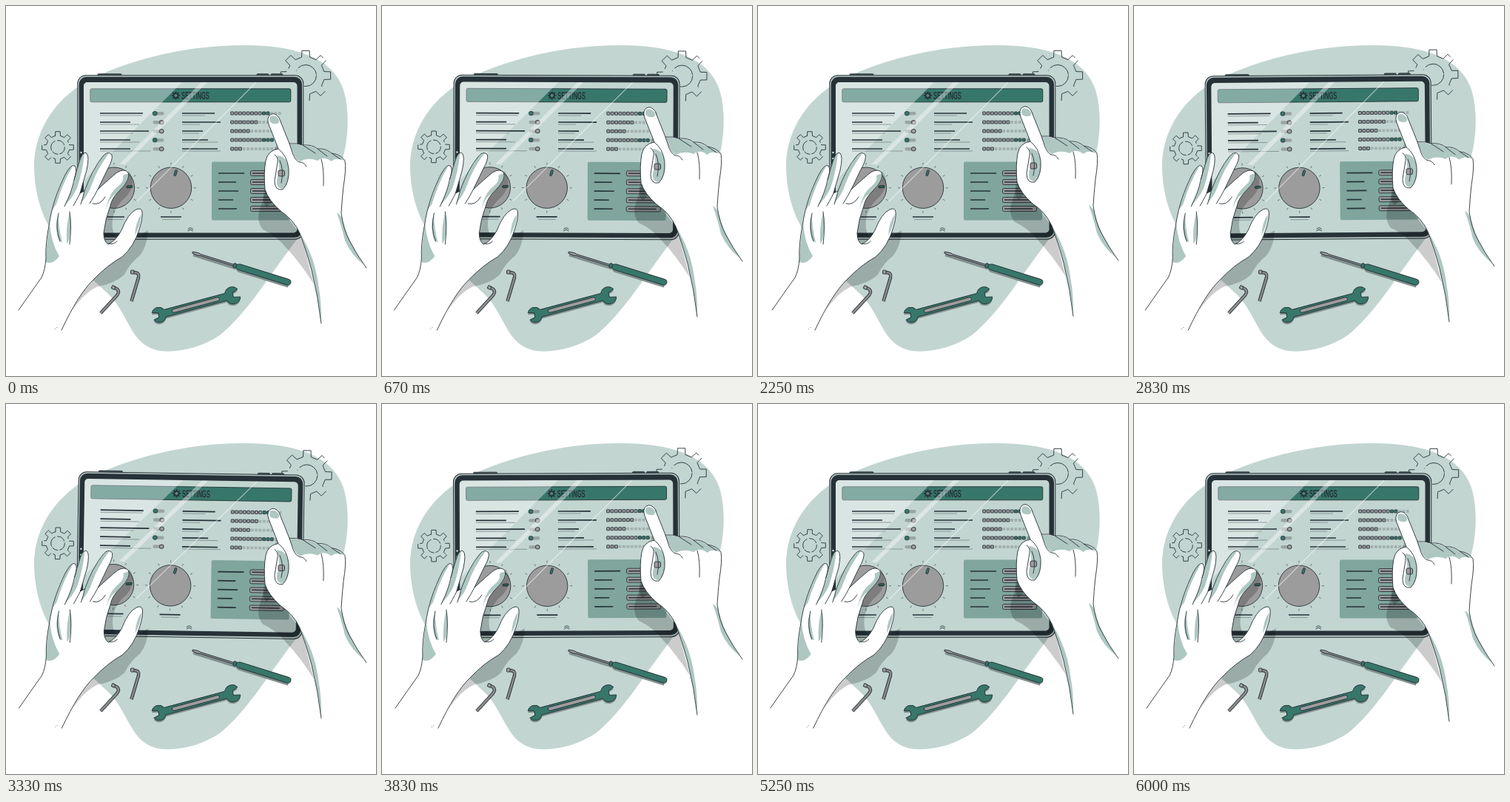
Animation of 500 by 500 pixels, one loop 6.04 s. Source, as an HTML page:

```html
<!DOCTYPE html>
<html lang="en">
<head>
<meta charset="utf-8">
<title>Settings</title>
<style>
  html, body { margin: 0; width: 100%; height: 100%; overflow: hidden; background: #fff; }
  svg { display: block; width: 100%; height: 100%; }
  .line { fill: none; stroke: #263238; stroke-width: .9; stroke-linecap: round; stroke-linejoin: round; }
  .skin { fill: #fff; }
  .shade { fill: #aec7c1; }
  .shadow { fill: #000; opacity: .2; }
  .green { fill: #37776a; stroke: #263238; stroke-width: .9; }
  .gray { fill: #9c9c9c; stroke: #263238; stroke-width: .9; }
  text { font: bold 14px "Liberation Sans", Arial, sans-serif; fill: #263238; }
</style>
</head>
<body>
<svg viewBox="0 0 500 500">
  <defs>
    <clipPath id="screen"><rect x="105" y="103" width="288.500" height="203.500" rx="5"/></clipPath>
    <path id="leftHand" d="M17 411Q33 388 48 367Q53 357 54 341Q53 322 58 297C62 270 69 251 80 228Q88 213 93 216Q97 220 92 235Q97 216 101 205Q105 196 109 199Q113 203 109 222L100 253L106 250Q117 220 131 203Q138 195 143 201Q145 207 137 221L124 248Q139 234 150 225Q160 219 165 225Q169 234 154 249Q143 259 141 270Q134 288 132 307Q132 318 138 322Q149 317 156 303Q165 280 176 275Q183 272 184 278Q185 287 180 302Q173 325 157 339Q137 350 118 370Q98 389 75 438"/>
    <path id="rightHand" d="M426 429Q422 393 413 357Q405 328 397 307Q389 289 371 277Q355 263 350 248Q348 225 351 209Q354 195 368 193L355 160Q352 151 357 147Q363 143 369 151L383 186Q393 185 401 188Q414 187 421 193Q432 192 440 199Q453 201 458 209Q460 220 456 244Q454 263 453 280Q456 302 464 317Q474 336 487 354"/>
  </defs>

  <path fill="#c2d5d1" d="M38 219C37 165 71 120 118 97C178 69 250 53 322 53C390 53 441 69 456 113C466 146 463 194 447 228C430 264 405 299 377 337C349 375 323 417 290 444C262 464 224 470 203 465C170 456 167 423 143 394C119 369 83 345 65 309C47 283 39 252 38 219Z"/>

  <g id="device">
    <g id="gears" class="line"></g>
    <g class="gray" style="fill:#46545a">
      <rect x="124" y="91.800" width="32" height="3" rx="1"/>
      <rect x="339" y="91.800" width="16" height="3" rx="1"/>
      <rect x="358" y="91.800" width="16" height="3" rx="1"/>
    </g>
    <rect x="96.800" y="93.800" width="305" height="221.400" rx="11" fill="#b9c9c6" stroke="#263238"/>
    <rect x="98.600" y="95.800" width="301.400" height="217" rx="10" fill="#263238"/>
    <rect x="105" y="103" width="288.500" height="203.500" rx="5" fill="#c2d5d1"/>
    <g fill="#dfe8e6"><circle cx="101.500" cy="198" r="1.200"/><circle cx="101.500" cy="206" r="1.200"/></g>
    <g clip-path="url(#screen)">
      <rect class="green" x="113.800" y="111.800" width="271" height="18" rx="2"/>
      <path fill="#fff" opacity=".38" d="M105 103H238L105 236Z"/>
      <g id="widgets"></g>
      <g id="title"></g>
      <g fill="#fff">
        <path opacity=".4" d="M264 103H272L161 214H153Z"/>
        <path opacity=".6" d="M337.500 103H339L178 264H176.500Z"/>
      </g>
    </g>
  </g>

  <g id="tools"></g>

  <g id="left">
    <path class="shadow" d="M192 303Q191 324 181 337Q167 348 160 363Q147 375 124 379Q106 387 90 411Q98 388 122 366L160 330Q176 311 192 303Z"/>
    <path class="shadow" d="M166 223Q178 240 162 258Q147 270 144 288Q142 307 151 314L137 324Q126 310 134 282L145 252Z"/>
    <use href="#leftHand" class="skin"/>
    <g class="shade">
      <path d="M54 346Q54 322 59 294Q61 320 72 338Q63 350 54 346Z"/>
      <path d="M71 282Q71 300 76 319Q71 320 69 308Q66 294 71 282Z"/>
      <path d="M86 279Q81 296 82 321Q86 318 87 306Q89 292 86 279Z"/>
      <path d="M62 276Q70 250 81 227Q86 217 90 217Q77 238 68 268Z"/>
      <path d="M79 269Q91 248 96 222Q100 201 106 199Q104 222 96 246Q89 261 79 269Z"/>
      <path d="M101 266Q110 233 129 206Q135 198 139 199Q123 221 116 241Q110 258 101 266Z"/>
      <path d="M158 229Q167 224 166 232Q161 245 148 254Q139 260 135 275Q139 253 151 244Q160 237 158 229Z"/>
      <path d="M183 281Q182 296 174 310Q175 292 183 281Z"/>
    </g>
    <use href="#leftHand" class="line"/>
    <path class="line" d="M79 271Q89 251 92 235M91 270Q99 256 101 251M101 268Q104 260 106 250M113 267Q120 256 124 248M86 278Q89 298 86 322M71 280Q66 300 73 318M117 267Q127 270 134 258M139 321Q145 323 150 318"/>
    <path class="line" d="M66 436l.6 .6M68.500 434.500l.3 0" opacity=".6"/>
  </g>

  <g id="right">
    <path class="shadow" d="M344 272Q337 290 347 302Q365 310 378 326Q397 346 416 376L399 310L372 275L351 250Z"/>
    <path class="shadow" d="M369 173L383 202L384 240L352 272Q344 262 350 246Z"/>
    <use href="#rightHand" class="skin"/>
    <g class="shade">
      <path d="M383 187Q392 186 401 189Q414 188 421 194Q432 193 440 200Q453 202 457 209Q445 204 440 210Q429 202 421 209Q409 204 397 210Q391 207 388 199Z"/>
      <path d="M357 149Q364 146 369 154Q370 160 363 159Q357 159 356 154Z"/>
      <path d="M397 307Q417 338 422 376Q427 404 426 429Q422 393 413 357Q405 328 397 307Z"/>
      <path d="M447 279Q454 283 456 293Q462 317 484 350Q467 337 458 317Q454 299 447 279Z"/>
      <path d="M366 202Q381 203 382 221Q384 239 374 247Q363 246 367 231Q372 219 366 202Z"/>
    </g>
    <rect class="gray" x="368" y="222" width="8.500" height="8" rx="2"/>
    <use href="#rightHand" class="line"/>
    <path class="line" d="M383 186L388 201Q392 210 397 211Q403 211 406 217M401 188L418 199M421 193L434 203M440 199L452 207M426 207Q430 220 429 243"/>
    <path class="line" d="M368 193Q380 202 382 220Q383 239 374 248Q363 250 363 236L367 211Q368 204 363 201M370 209Q376 222 372 239"/>
  </g>
</svg>
<script>
const $ = id => document.getElementById(id);
const range = n => [...Array(n).keys()];
const bar = (x1, x2, y, w = 1.7, c = '#263238') =>
  `<path d="M${x1} ${y}H${x2}" stroke="${c}" stroke-width="${w}"/>`;
const box = (x, y, w, h, r, cls, extra = '') =>
  `<rect x="${x}" y="${y}" width="${w}" height="${h}" rx="${r}" class="${cls}" ${extra}/>`;

// Toothed outline: two inner and two outer corners per tooth.
function gear(cx, cy, inner, outer, teeth = 8) {
  const step = 2 * Math.PI / teeth;
  const pts = range(teeth).flatMap(i =>
    [[-.27, inner], [-.19, outer], [.19, outer], [.27, inner]].map(([k, r]) => {
      const a = (i + k) * step - Math.PI / 2;
      return (cx + r * Math.cos(a)).toFixed(1) + ' ' + (cy + r * Math.sin(a)).toFixed(1);
    }));
  return `M${pts.join('L')}Z`;
}

$('gears').innerHTML = `
  <path d="${gear(405, 94, 25.5, 34)}" pathLength="100" stroke-dasharray="17 2 19 3 12 14 0 3 14 2 14 0"/>
  <circle cx="405" cy="94" r="14.500" pathLength="100" stroke-dasharray="27 13 0 18 0 5 35 2"/>
  <path d="${gear(70, 191, 16, 21.5)}" pathLength="100" stroke-dasharray="23 2 14 1 21 2 18 2 17 0"/>
  <circle cx="70" cy="191" r="9.300" pathLength="100" stroke-dasharray="20 5 14 4 25 6"/>`;

$('title').innerHTML = `
  <path d="${gear(229.5, 121, 4, 5.8)}" fill="#263238"/>
  <circle cx="229.500" cy="121" r="2.100" fill="#56867c"/>
  <text transform="translate(237 126) scale(.54 1)">SETTINGS</text>`;

// Each row: ends of the two left bars, switch state, ends of the two right bars, gray and green cells.
const rows = [
  [185, 184, 1, 282, 269, 8, 2],
  [168, 180, 0, 290, 262, 7, 0],
  [193, 172, 0, 266, 261, 5, 0],
  [168, 180, 1, 273, 286, 8, 3],
  [168, 196, 0, 286, 290, 3, 0]
];
const faint = '#6d7d7b';
const row = ([a, b, on, c, d, gray, green], i) => {
  const y = 145 + i * 12;
  const cells = range(13).map(k => {
    const x = 303.7 + k * 5.35;
    if (k >= gray + green) return box(x, y - 1.9, 3.8, 3.8, .5, '', 'fill="#a3b1ae"');
    return box(x, y - 2, 4, 4, .5, k < gray ? 'gray' : 'green');
  });
  return bar(127, a, y) + bar(127, b, y + 3, .7, faint)
    + bar(238, c, y) + bar(238, d, y + 3, .7, faint)
    + box(198.5, y - 2, 15, 4.5, 2, '', 'fill="#9aa5a3"')
    + box(on ? 198.5 : 207.5, y - 2.4, 5.5, 5.2, 2, on ? 'green' : 'gray')
    + cells.join('');
};

const dial = (x, angle) => `
  <g transform="translate(${x} 245.700)">
    ${range(12).map(i => `<path d="M0-31V-34" stroke="#52625f" stroke-width=".8" transform="rotate(${i * 30})"/>`).join('')}
    <circle r="27.700" class="gray"/>
    <g transform="rotate(${angle})">${box(-1.4, -25, 2.8, 8, 1, 'green')}</g>
  </g>` + bar(x - 14, x + 14, 285) + bar(x - 12, x + 12, 288.5, .7, faint);

$('widgets').innerHTML = rows.map(row).join('') + dial(146, 86) + dial(223, 17)
  + box(278, 210.5, 106, 79, 2, '', 'fill="#7fa59c"')
  + [322, 311, 314, 307, 312].map((end, i) => {
    const y = 226 + i * 12;
    return bar(287, end, y) + box(330.5, y - 3.5, 46, 7, 2, 'gray') + bar(333, 371, y, 1.5);
  }).join('')
  + '<path class="line" d="M246 301.500q3-3.500 6.500 0M246 304q3-3.500 6.500 0"/>';

const rod = d => [[4.4, '#263238'], [2.6, '#8c8c8c']].map(([w, c]) =>
  `<path d="${d}" fill="none" stroke="${c}" stroke-width="${w}" stroke-linejoin="round"/>`).join('');

const wrench = 'M-43-5H42A10 10 0 0 1 60-6L52-3V3L61 5A10 10 0 0 1 42 5H-43A9.500 9.500 0 0 1 -60 5L-52 3V-3L-60-5A9.500 9.500 0 0 1 -43-5Z';

$('tools').innerHTML = `
  <path d="${wrench}" fill="#81908d" transform="translate(256.500 406.500) rotate(-15)"/>
  <g transform="translate(256.500 404) rotate(-15)">
    <path d="${wrench}" class="green"/>
    ${box(-33, -2.5, 66, 5, 2.5, 'gray')}
  </g>
  <g transform="translate(252 333) rotate(17.300)">
    <path d="M2 3H64L67 5H137" stroke="#81908d" stroke-width="4" fill="none"/>
    <path class="gray" d="M0-1L8-1.800L11-1H59V1H11L8 2L0 1Z"/>
    ${box(58, -3, 4, 6, 1, 'green')}
    <path class="green" d="M62-2L66-4H135Q139-4 139 0Q139 4 135 4H66L62 2Z"/>
  </g>
  ${rod('M170 359.500L176 360.500Q180 361 179 367L169.500 399')}
  ${rod('M145 380L150 382.500Q154 386 150 391L128 415')}
  <rect class="gray" x="168.500" y="357" width="4.500" height="5" rx="1"/>
  <rect class="gray" x="143" y="378" width="4.500" height="4.500" rx="1" transform="rotate(30 145 380)"/>`;

// Linear interpolation through equally spaced values.
function through(values, phase) {
  const p = phase * (values.length - 1), i = Math.floor(p);
  return values[i] + (values[i + 1] - values[i]) * (p - i);
}

const LOOP = 6040, CYCLE = 6000, BEAT = 1500;
const shake = [0, -1, 2, -4, 4, -4, 4, -4, 2, -1, 0];
const start = performance.now();

function draw() {
  const t = (performance.now() - start) % LOOP;
  const beat = t % BEAT / BEAT;
  const tilt = through([0, 1, 0, -1, 0], beat);
  $('device').setAttribute('transform', `rotate(${tilt} 244 190)`);
  $('left').setAttribute('transform', `translate(${through(shake, t % CYCLE / CYCLE)} 0)`);
  $('right').setAttribute('transform', `translate(0 ${through([0, -10, 0], beat)})`);
  requestAnimationFrame(draw);
}
draw();
</script>
</body>
</html>
```
